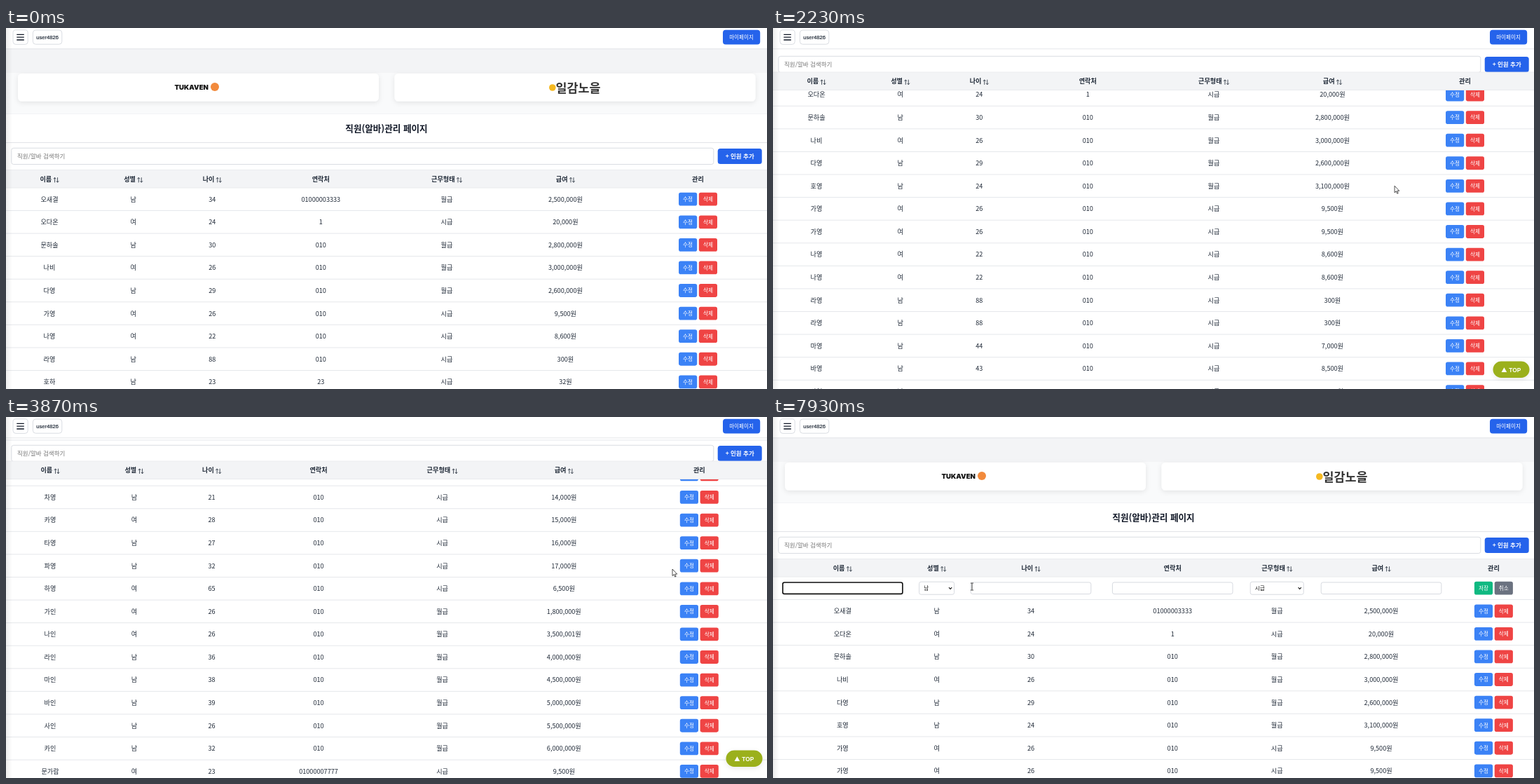
Recreate the animation shown at these times as an HTML page. Size 1086 by 515 pixels, loop 8 s.

```html
<!DOCTYPE html>
<html lang="ko">
<head>
<meta charset="utf-8">
<title>직원 관리</title>
<style>
html, body { margin: 0; width: 100%; height: 100%; overflow: hidden; background: #fff; }
svg { display: block; width: 1086px; height: 515px; }
text { font-family: "Noto Sans CJK KR", "Noto Sans KR", "Noto Sans CJK", sans-serif; font-size: 9.15px; fill: #1f2937; }
.mid { text-anchor: middle; }
.btn { font-size: 7.6px; font-weight: 500; fill: #fff; }
.ui { font-family: "Liberation Sans", "Noto Sans CJK KR", "Noto Sans CJK", sans-serif; font-size: 7.6px; fill: #111; }
.bold { font-weight: 700; }
</style>
</head>
<body>
<svg id="stage" viewBox="0 0 1086 515">
  <defs>
    <filter id="soft" x="-10%" y="-60%" width="120%" height="240%">
      <feDropShadow dx="0" dy="2" stdDeviation="3.5" flood-color="#000" flood-opacity=".09"/>
    </filter>
    <linearGradient id="edge">
      <stop offset="0" stop-color="#000" stop-opacity=".07"/>
      <stop offset="1" stop-color="#000" stop-opacity="0"/>
    </linearGradient>
  </defs>
  <rect width="1086" height="515" fill="#fff"/>
  <g id="page">
    <rect y="0" width="1086" height="64.5" fill="#f3f4f6"/>
    <rect y="64.5" width="1086" height="58" fill="#f9fafb"/>
    <g filter="url(#soft)" fill="#fff">
      <rect x="17" y="65" width="515" height="39.5" rx="5.5"/>
      <rect x="554.5" y="65" width="515" height="39.5" rx="5.5"/>
    </g>
    <text x="240.5" y="88" class="bold" style="font-family:Inter,sans-serif;font-size:9.6px;font-weight:900;fill:#111">TUKAVEN</text>
    <circle cx="298" cy="84" r="6" fill="#f28a3c"/>
    <circle cx="779.8" cy="85" r="4.8" fill="#f5b921"/>
    <text x="784.5" y="91.8" class="bold" style="font-size:17.4px;fill:#333">일감노을</text>
    <rect y="122.5" width="1086" height="41" fill="#fff"/>
    <path d="M0 122.5H1086" stroke="#f1f2f4" stroke-width=".8"/>
    <path d="M0 163.5H1086" stroke="#e2e4e8"/>
    <text x="543" y="148.4" class="mid bold" style="font-size:12.6px;fill:#111827">직원(알바)관리 페이지</text>
    <g id="rows"></g>
  </g>
  <g id="search">
    <rect y="165" width="1086" height="37.5" fill="#fff"/>
    <rect x="7.8" y="171.3" width="1002" height="23.2" rx="3" fill="#fff" stroke="#d1d5db" stroke-width=".8"/>
    <text x="16" y="186.2" style="font-size:8.5px;fill:#757575">직원/알바 검색하기</text>
    <rect id="add" x="1015.7" y="172" width="63" height="22" rx="3.5"/>
    <text x="1047.2" y="186.2" class="mid btn bold" style="font-size:8.5px">+ 인원 추가</text>
  </g>
  <g id="head"></g>
  <g id="top">
    <rect x="1027.5" y="475.5" width="52" height="23.5" rx="11.75" fill="#9bb01d" filter="url(#soft)"/>
    <path d="M1039.6 491L1043.4 484.2L1047.2 491Z" fill="#fff"/>
    <text x="1050.3" y="490.5" class="ui bold" style="font-size:8.3px;fill:#fff">TOP</text>
  </g>
  <g>
    <rect width="1086" height="29.5" fill="#fff"/>
    <path d="M0 29.8H1086" stroke="#e3e5e9" stroke-width=".9"/>
    <g fill="#fff" stroke="#d1d5db" stroke-width=".8">
      <rect x="10" y="2.8" width="21.2" height="20.6" rx="4"/>
      <rect x="38.4" y="3" width="41.4" height="20.2" rx="4"/>
    </g>
    <path d="M15.3 9.4H25.8M15.3 13.2H25.8M15.3 17H25.8" stroke="#111827" stroke-width="1.3"/>
    <text x="59.1" y="16" class="ui mid" style="fill:#1f2937;stroke:#1f2937;stroke-width:.2px">user4826</text>
    <rect x="1023" y="2.8" width="53.2" height="20.6" rx="4" fill="#2563eb"/>
    <text x="1049.6" y="16" class="mid btn">마이페이지</text>
  </g>
  <rect width="9" height="515" fill="url(#edge)"/>
  <g id="cursor">
    <path id="arrow" d="M0 0V9.6L2.2 7.6L3.7 11L5.2 10.4L3.7 7.1H6.7Z" fill="#fff" stroke="#222" stroke-width=".8"/>
    <path id="beam" d="M-2 -5H-.6L0 -4.5L.6 -5H2M0 -4.5V4.5M-2 5H-.6L0 4.5L.6 5H2" fill="none" stroke="#222" stroke-width=".9"/>
  </g>
</svg>
<script>
const $ = id => document.getElementById(id);
const LOOP = 8000, PITCH = 32.58, FIRST = 228.3;

// name, gender, age, pay; optional phone
const parse = s => s.trim().split('\n').map(l => {
  const [name, sex, age, pay, tel = '010'] = l.trim().split(' ');
  return { name, sex, age, pay: +pay, tel, kind: +pay >= 1e6 ? '월급' : '시급' };
});
const people = parse(`오새결 남 34 2500000 01000003333
  오다온 여 24 20000 1
  문하솔 남 30 2800000
  나비 여 26 3000000
  다영 남 29 2600000
  호영 남 24 3100000
  가영 여 26 9500
  가영 여 26 9500
  나영 여 22 8600
  나영 여 22 8600
  라영 남 88 300
  라영 남 88 300
  마영 남 44 7000
  바영 남 43 8500
  사영 남 15 8000
  아영 여 26 12001
  자영 여 27 13000
  차영 남 21 14000
  카영 여 28 15000
  타영 남 27 16000
  파영 남 32 17000
  하영 여 65 6500
  가인 여 26 1800000
  나인 여 26 3500001
  라인 남 36 4000000
  마인 남 38 4500000
  바인 남 39 5000000
  사인 남 26 5500000
  카인 남 32 6000000
  문가람 여 23 9500 01000007777`);
const firstPage = [0, 1, 2, 3, 4, 6, 8, 10].map(i => people[i])
  .concat(parse('호하 남 23 32 23'));
const blank = { name: '', sex: '남', age: '', tel: '', kind: '시급', pay: '' };

const columns = {
  start: [62, 181.7, 294.2, 449.3, 629, 798.4, 987.5],
  more: [63, 183, 293.6, 446, 622.6, 796.3, 989.3],
  edit: [99.3, 233.6, 368, 570.2, 719.2, 868, 1028.4]
};
const titles = ['이름', '성별', '나이', '연락처', '근무형태', '급여', '관리'];

const text = (x, y, s, cls = 'mid') => `<text x="${x}" y="${y}" class="${cls}">${s}</text>`;
const box = (x, y, w, h, r, attrs) =>
  `<rect x="${x}" y="${y}" width="${w}" height="${h}" rx="${r}" ${attrs}/>`;

function buttons(c, y, labels, fills, i) {
  return labels.map((s, k) => {
    const x = c + (k ? 14.4 : -14.4);
    return box(x - 13.1, y - 9.4, 26.2, 18.8, 2.8, `fill="${fills[k]}" data-row="${i}" data-k="${k}"`) +
      text(x, y + 2.9, s, 'mid btn');
  }).join('');
}

function field(c, y, w, value, list) {
  const x = c - w / 2, h = list ? 18 : 16.6;
  const arrow = list ? `<path d="M${x + w - 7.6} ${y - 1}l2.1 2.2l2.1 -2.2" fill="none" stroke="#111" stroke-width="1.1"/>` : '';
  return box(x, y - h / 2, w, h, 2.6, 'fill="#fff" stroke="#cdd1d8" stroke-width=".8"') +
    text(x + (list ? 6.6 : 4), y + 2.8, value, 'ui') + arrow;
}

function formRow(p, c, y, i, focus) {
  const vals = [p.name, p.sex, p.age, p.tel, p.kind, p.pay];
  const wide = { 1: 50, 4: 76 };
  let s = vals.map((v, k) => field(c[k], y, wide[k] || 171.6, v, k in wide)).join('');
  if (focus) {
    s += box(13.9, y - 8.2, 171, 16.4, 2.4, 'fill="#fff" stroke="#101010" stroke-width="1.6"') +
      `<path id="caret" d="M18.2 ${y - 4.8}v9.4" stroke="#111" stroke-width=".8"/>`;
  }
  return s + buttons(c[6], y, ['저장', '취소'], ['#10b981', '#6b7280'], i);
}

function plainRow(p, c, y, i) {
  const vals = [p.name, p.sex, p.age, p.tel, p.kind, p.pay.toLocaleString('en-US') + '원'];
  return vals.map((v, k) => text(c[k], y + 3.4, v)).join('') +
    buttons(c[6], y, ['수정', '삭제'], ['#3b82f6', '#ef4444'], i);
}

function buildTable(list, c, form, focus) {
  $('rows').innerHTML = list.map((p, i) => {
    const top = FIRST + i * PITCH, y = top + 15.9;
    return (i === form ? formRow(p, c, y, i, focus) : plainRow(p, c, y, i)) +
      `<path d="M0 ${top + PITCH - .4}H1086" stroke="#e3e5e9" stroke-width=".9"/>`;
  }).join('');
  $('head').innerHTML = box(0, 202.4, 1086, 25.9, 0, 'fill="#f3f4f6"') +
    '<path d="M0 202.5H1086M0 228H1086" stroke="#e5e7eb" stroke-width=".7"/>' +
    titles.map((s, k) => {
      if (k === 3 || k === 6) return text(c[k], 218.9, s, 'mid bold');
      const w = s.length * 8.42, x = c[k] - (w + 10.3) / 2, a = x + w + 4.3;
      return text(x, 218.9, s, 'bold') +
        `<path d="M${a} 220.4v-7m-1.8 2l1.8 -2l1.8 2M${a + 4} 213.2v7m-1.8 -2l1.8 2l1.8 -2" fill="none" stroke="#1f2937" stroke-width=".8"/>`;
    }).join('');
}

// Phases of the table, chosen by start time
const phases = [
  [0, () => buildTable(firstPage, columns.start)],
  [1900, () => buildTable(people, columns.start)],
  [3250, () => buildTable(people, columns.more)],
  [4210, () => buildTable(people, columns.edit, 20)],
  [5380, () => buildTable(people, columns.more)],
  [5950, () => buildTable([blank, ...people], columns.edit, 0, true)]
];

const scrollKeys = [[0, 0], [1550, 0], [1690, 8.2], [1900, 8.2], [2450, 275], [2780, 275],
  [3050, 366], [3250, 366], [3800, 683.6], [5950, 683.6], [6250, 0], [LOOP, 0]];
const cursorKeys = [[130, 797, 364], [330, 868, 225], [500, 937, 106], [670, 886, 148],
  [870, 886, 148], [1350, 976, 160.5], [1550, 976, 160.5], [1800, 983, 175], [1900, 983, 175],
  [2480, 824.5, 258], [3250, 824.5, 258], [3830, 951, 217], [3900, 951, 217], [4180, 966, 211.5],
  [4500, 966, 211.5], [4640, 975.5, 211.5], [4820, 975.5, 211.5], [5290, 1038.7, 209],
  [5580, 1038.7, 209], [5860, 1052.5, 51], [6400, 1052.5, 51], [6970, 774, 317],
  [7210, 774, 317], [7920, 284, 242], [LOOP, 284, 242]];

function at(keys, t) {
  let i = keys.findIndex(k => k[0] > t);
  if (i === 0) return keys[0].slice(1);
  if (i < 0) i = keys.length - 1;
  const a = keys[i - 1], b = keys[i];
  const p = Math.min(1, (t - a[0]) / (b[0] - a[0])), e = p * p * (3 - 2 * p);
  return a.slice(1).map((v, k) => v + (b[k + 1] - v) * e);
}

const shift = (id, x, y) => $(id).setAttribute('transform', `translate(${x} ${y})`);
const show = (id, on) => $(id).setAttribute('visibility', on ? 'visible' : 'hidden');
const hoverFill = { '#3b82f6': '#2563eb', '#ef4444': '#dc2626', '#10b981': '#059669', '#6b7280': '#4b5563' };
let phase = -1, hot = null, hotFill;

function hover(x, y) {
  if (hot) hot.setAttribute('fill', hotFill);
  hot = null;
  for (const r of $('rows').querySelectorAll('[data-k]')) {
    const dx = x - r.getAttribute('x'), dy = y - r.getAttribute('y');
    if (dx > 0 && dx < 26.2 && dy > 0 && dy < 18.8) {
      hot = r;
      hotFill = r.getAttribute('fill');
      r.setAttribute('fill', hoverFill[hotFill]);
      break;
    }
  }
}

function overField(x, y, t, barY) {
  if (x > 8 && x < 1010 && Math.abs(y - 183 - barY) < 11.5) return true;
  if (t < 5950 || Math.abs(y - 244) > 8.3) return false;
  return [0, 2, 3, 5].some(k => Math.abs(x - columns.edit[k]) < 85.8);
}

function draw(t) {
  let n = phases.length - 1;
  while (phases[n][0] > t) n--;
  if (n !== phase) {
    phase = n;
    hot = null;
    phases[n][1]();
  }
  const [sy] = at(scrollKeys, t), [x, y] = at(cursorKeys, t);
  const barY = -Math.min(sy, 131);
  shift('page', 0, -sy);
  shift('search', 0, barY);
  shift('head', 0, -Math.min(sy, 139.5));
  show('top', sy > 115);
  if (y > 88) hover(x, y + sy);
  $('add').setAttribute('fill', t > 5830 && t < 6420 ? '#1d4fd7' : '#2563eb');

  const seen = t >= 130, beam = overField(x, y, t, barY);
  shift('cursor', x, y);
  show('arrow', seen && !beam);
  show('beam', seen && beam);
  if ($('caret')) show('caret', Math.floor((t - 5950) / 500) % 2 === 0 && t < 7950);
}

const begin = performance.now();
function tick() {
  draw((performance.now() - begin) % LOOP);
  requestAnimationFrame(tick);
}
tick();
</script>
</body>
</html>
```
